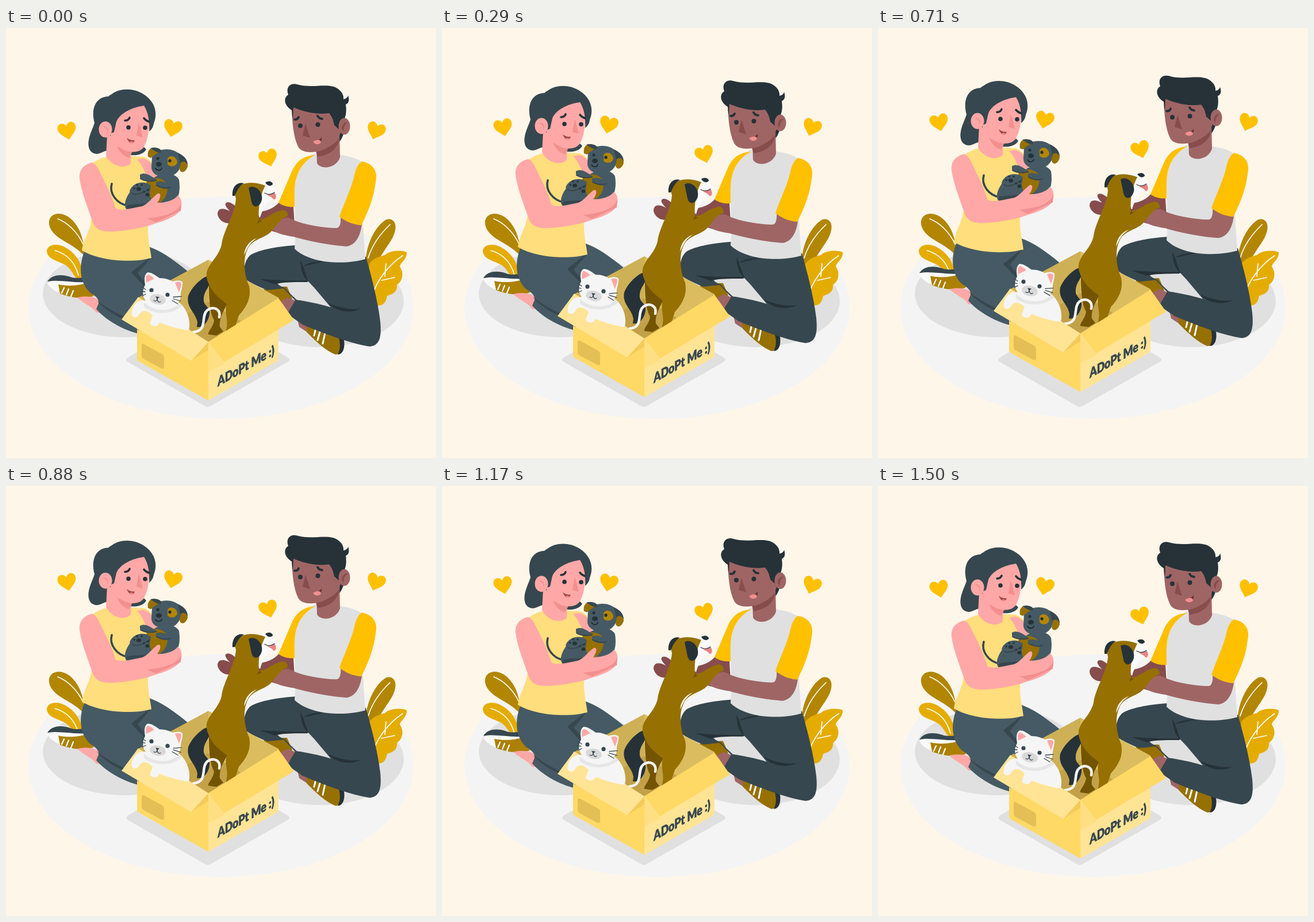
Recreate the animation shown at these times as an HTML page. Size 748 by 748 pixels, loop 1540 ms.

```html
<!DOCTYPE html>
<html lang="en">
<head>
<meta charset="utf-8">
<title>Adopt me</title>
<style>
html,body{margin:0;width:100%;height:100%;overflow:hidden;background:#fff6ea}
svg{display:block;width:100vw;height:100vh}
.line{fill:none;stroke-linecap:round;stroke-linejoin:round}
.ink{fill:#263238}.slate{fill:#37474f}.blue{fill:#455a64}
.skin{fill:#ffa8a7}.blush{fill:#f28f8f}
.tan{fill:#9f6565}.cocoa{fill:#874c4c}
.fur{fill:#967000}.deep{fill:#735400}
.white{fill:#fafafa}.cat{fill:#f5f5f5}.gold{fill:#ffc000}
.sun{fill:#ffd966}.cream{fill:#ffe496}
text{font:900 22px Lato,Inter,sans-serif;fill:#37474f;stroke:#37474f;stroke-width:.6}
</style>
</head>
<body>
<svg viewBox="0 0 748 748">
<defs>
  <path id="heart" d="M0 16C-6 9-16 4-16-5C-16-15-4-17 0-8C4-17 16-15 16-5C16 4 6 9 0 16Z"/>
</defs>

<!-- ground and plants -->
<ellipse cx="374" cy="486.5" rx="335" ry="193.5" fill="#f4f4f4"/>
<g fill="#e0e0e0">
  <ellipse cx="206" cy="462" rx="142" ry="76"/>
  <ellipse cx="546" cy="475" rx="146" ry="80"/>
  <path d="M212 573L345 497Q351 494 357 497L490 573Q496 577 490 581L357 657Q351 661 345 657L212 581Q206 577 212 573Z"/>
</g>
<path d="M140 400C120 377 96 371 84 358C70 344 72 325 90 323C110 322 129 344 134 372Z" fill="#b28600"/>
<path d="M140 450C118 438 117 421 103 412C88 404 71 402 71 387C73 376 89 374 102 381C120 390 130 406 134 426Z" fill="#e5ac00"/>
<path d="M628 436C618 394 637 349 660 334C672 329 680 338 677 352C673 374 649 390 637 432Z" fill="#b28600"/>
<path d="M632 410C640 400 648 398 659 395C666 388 684 385 697 390C698 402 686 408 685 415C693 427 690 440 680 447C681 460 672 463 663 466C661 479 654 485 642 482L628 475Z" fill="#e5ac00"/>
<g class="line" stroke="#fff" stroke-width="1.700">
  <path d="M90 332C106 338 124 354 134 376M85 387C106 393 120 408 126 430"/>
  <path d="M668 342C651 358 637 377 630 400M690 396C665 412 645 440 638 463M659 432L661 410M653 439L676 434"/>
</g>

<g id="float">
  <!-- hearts -->
  <g class="gold">
    <use href="#heart" transform="translate(106.500 178.500) rotate(-12)"/>
    <use href="#heart" transform="translate(290 174) rotate(13)"/>
    <use href="#heart" transform="translate(456.500 225.500) rotate(-17)"/>
    <use href="#heart" transform="translate(643.500 178.500) rotate(19)"/>
  </g>

  <!-- woman: foot and legs -->
  <path class="white" d="M72 443C87 436 112 438 136 442L140 462L108 466C92 462 76 454 72 443Z"/>
  <path d="M91 446C108 450 128 448 142 443L153 466C140 471 116 471 94 462Z" fill="#ac8000"/>
  <path class="slate" d="M72 441C80 428 97 428 112 433C123 437 131 433 137 435L140 442C119 444 92 437 72 441Z"/>
  <path class="line" d="M101 452L97 461M109 454L105 464M117 457L113 467" stroke="#fff" stroke-width="2.200"/>
  <path class="skin" d="M124 469C140 465 155 467 166 476L164 495L157 495C150 484 137 481 124 469Z"/>
  <path class="blue" d="M138 385C126 412 127 442 146 460C159 468 162 473 161 479L157 489C175 510 208 527 232 532L330 510L325 431C301 410 275 390 250 381Z"/>
  <path class="slate" d="M218 425L254 396C246 406 238 417 229 426L243 444L240 449ZM158 474C182 492 210 506 235 514C202 510 176 494 158 474Z"/>

  <!-- woman: torso and head -->
  <path class="slate" d="M208 213C221 218 233 214 240 207L244 211C239 221 223 223 212 220Z"/>
  <path d="M150 236C160 227 176 223 184 222L240 224C255 230 262 245 262 262V330L247 345C246 365 251 384 253 400C220 409 164 406 132 387C135 364 149 351 149 325Z" fill="#ffde7d"/>
  <path class="skin" d="M238 227C252 230 258 240 264 264L244 256C239 244 234 234 228 229Z"/>
  <path class="slate" d="M158 219C151 219 145 214 144 207C141 192 151 176 154 165C147 139 157 119 179 119L205 150L187 212C170 212 168 218 158 219Z"/>
  <path class="skin" d="M176 185L218 203L217 235C207 247 182 240 174 222Z"/>
  <path class="blush" d="M193 204C204 213 213 216 220 215L214 226C204 223 196 215 193 204Z"/>
  <path class="skin" d="M182 163C179 188 184 201 198 208C214 217 230 219 239 208C248 194 250 172 249 150L240 125L190 128Z"/>
  <path class="slate" d="M174 172C165 143 173 119 184 115C198 104 222 104 239 115C258 127 265 146 257 166C256 173 253 177 249 180C250 160 247 146 240 135C220 138 199 147 192 163L188 181L181 184Z"/>
  <ellipse class="skin" cx="173" cy="176.500" rx="11.500" ry="14"/>
  <path class="blush" d="M168 171C177 170 180 177 176 185C178 176 174 174 168 171ZM231 164L227 187L238 190Z"/>
  <g class="ink"><circle cx="213" cy="173" r="3.800"/><circle cx="242" cy="173.500" r="3.800"/></g>
  <path class="line" d="M207 161Q213 161 215 156M240 157Q243 161 249 163" stroke="#263238" stroke-width="3.600"/>
  <path d="M210 191C214 194 219 196 224 195C222 203 214 202 210 191Z" fill="#9e4e4e"/>
  <path d="M215 198Q219 196 222 199Q218 202 215 198Z" fill="#ff8585"/>

  <!-- puppy -->
  <path class="line" d="M184 271C179 288 193 306 212 309" stroke="#37474f" stroke-width="3.600"/>
  <path class="blue" d="M252 266C262 251 294 249 301 264C304 284 300 300 290 304L264 306C252 317 225 321 210 316C202 307 211 291 218 282C227 268 242 274 252 266Z"/>
  <path class="fur" d="M248 262C264 258 278 263 281 274C282 289 276 301 261 306C248 303 256 285 239 278Z"/>
  <path class="slate" d="M210 309C224 304 244 308 258 302C258 316 224 322 210 316Z"/>
  <path class="blue" d="M215 284C219 269 240 264 252 274C250 285 252 295 240 296C232 292 222 293 215 284Z"/>
  <path class="blue" d="M233 255C244 249 254 260 263 264C254 269 239 268 233 260ZM261 268C274 263 286 275 298 276C284 284 267 279 261 273Z"/>
  <path class="line" d="M234 262C242 267 252 267 261 265M262 274C271 279 280 279 286 277M219 287C226 292 240 287 250 279" stroke="#37474f" stroke-width="2"/>
  <g class="ink"><ellipse cx="231" cy="280" rx="4" ry="3.300"/><circle cx="223" cy="279" r="1.700"/><circle cx="228" cy="273" r="1.700"/><circle cx="236" cy="273" r="1.700"/><ellipse cx="246" cy="290" rx="3.500" ry="3"/><circle cx="240" cy="285" r="1.700"/><circle cx="247" cy="282" r="1.700"/></g>
  <path class="blue" d="M254 224C263 208 290 207 302 220C308 236 303 251 289 257C272 264 252 256 253 241Z"/>
  <path class="fur" d="M247 224C245 212 252 205 265 210L271 215C262 217 258 222 252 226Z"/>
  <path class="slate" d="M251 209C261 206 274 211 269 217C261 217 258 213 251 209ZM299 217C310 222 316 229 316 238L304 240Z"/>
  <path class="fur" d="M304 234C310 230 316 234 316 241C312 253 303 253 302 245Z"/>
  <path d="M281 227C286 219 297 224 298 233C297 241 286 243 281 237Z" fill="#b28600"/>
  <g class="ink"><circle cx="285" cy="231" r="2.800"/><circle cx="264" cy="227" r="2.600"/><ellipse cx="266" cy="237" rx="5" ry="4"/></g>
  <path class="line" d="M260 244C264 250 271 247 271 243" stroke="#182126" stroke-width="1.400"/>

  <!-- woman: near arm -->
  <path class="skin" d="M150 234C135 237 126 248 128 262C131 285 142 312 150 335C154 350 165 355 185 354C219 352 244 346 263 339C282 334 300 325 304 315C307 303 305 296 299 291C292 301 276 304 263 304C270 295 270 286 264 288C254 295 247 306 237 310C217 314 196 319 190 313C187 298 173 270 163 250C159 241 155 236 150 234Z"/>
  <path class="blush" d="M305 303C302 320 275 329 245 331L261 338L304 318Z"/>

  <!-- man: far arm, legs and feet -->
  <path class="cocoa" d="M476 302L500 311L503 360C480 360 450 352 435 338L407 332C392 346 371 340 368 324C368 313 378 312 390 319C382 311 378 304 386 303C397 304 402 316 415 320C437 322 462 320 476 302Z"/>
  <path class="fur" d="M449 452C464 453 477 449 489 450L498 471L480 480L447 470Z"/>
  <path class="tan" d="M478 475L490 469L505 475L494 501Z"/>
  <path class="tan" d="M507 507L528 516L527 531L510 520Z"/>
  <path class="fur" d="M523 518C540 518 560 529 583 537C590 552 587 567 573 568C557 562 540 546 523 529Z"/>
  <path class="ink" d="M578 536L588 543C590 557 586 568 577 568C582 559 582 548 578 536Z"/>
  <path class="line" d="M539 522L536 535M547 525L542 543M555 530L551 549" stroke="#fff" stroke-width="3"/>
  <path class="slate" fill-rule="evenodd" d="M502 378C470 380 435 387 424 396C412 408 413 428 418 438C430 446 445 452 455 456L483 453L503 474C498 483 492 491 490 498L516 516C550 530 595 548 632 554C649 553 654 540 651 510C646 470 635 430 626 398ZM471 443C494 441 514 439 526 441C540 455 552 471 565 486C543 479 520 475 506 473C498 466 490 458 485 452C478 450 474 447 471 443Z"/>
  <path class="ink" d="M512 404C520 420 520 427 526 440C516 434 513 420 512 404ZM516 414C530 407 544 405 555 406C538 409 527 413 516 414ZM442 437C459 437 473 440 527 439L524 442C502 442 478 442 468 446ZM561 478C578 487 602 491 618 488C596 499 570 491 561 478Z"/>

  <!-- man: torso and head -->
  <path d="M531 222C540 212 574 212 583 221C605 224 626 232 628 246L621 340C622 365 624 385 625 402C590 412 530 411 502 384C505 350 501 300 502 280C505 256 510 233 531 222Z" fill="#e0e0e0"/>
  <path class="gold" d="M538 221C515 222 503 235 497 250L474 304C482 310 492 312 502 311C502 290 500 270 509 250C515 238 526 226 538 221Z"/>
  <path class="ink" d="M575 160L591 162C590 179 586 192 577 202Z"/>
  <path class="tan" d="M540 205L580 178L581 225C574 245 547 247 541 235Z"/>
  <path class="cocoa" d="M539 214C558 211 573 201 580 191C577 211 563 221 542 224Z"/>
  <path class="tan" d="M497 140C498 165 500 190 508 206C514 218 532 217 546 214C566 207 580 195 584 175L580 130L510 125Z"/>
  <path class="ink" d="M499 158C497 151 498 147 497 143C485 136 481 122 491 116C486 103 495 95 506 98C530 105 550 97 570 102C583 107 588 116 587 124C592 123 595 120 595 117C598 126 596 131 591 133C593 146 591 157 585 164L579 176L571 169C569 158 566 153 562 148C543 151 520 147 500 138Z"/>
  <ellipse class="tan" cx="588.500" cy="171" rx="10" ry="14.500"/>
  <path class="cocoa" d="M584 175C585 166 590 163 595 164C589 167 588 172 587 180ZM521 166L516 187L529 191Z"/>
  <g class="ink"><circle cx="512" cy="170" r="4"/><circle cx="542.500" cy="168" r="4"/></g>
  <path class="line" d="M502 159Q507 160 509 155M542 153Q545 158 550 158" stroke="#263238" stroke-width="3.800"/>
  <path d="M534 198C541 197 546 194 549 190C551 199 542 205 534 198Z" fill="#6b3333"/>
  <path d="M534 198C541 193 548 194 548 199C544 204 537 203 534 198Z" fill="#f28f8f"/>

  <!-- man: near arm -->
  <path class="tan" d="M582 325C583 340 581 349 573 348C548 347 515 342 494 331C485 326 470 337 460 348C468 357 485 361 500 363C530 372 565 378 592 380C609 378 617 360 619 341Z"/>
  <path class="gold" d="M619 232C640 236 647 250 643 268C640 295 630 320 618 343C603 342 590 336 580 328C590 300 602 276 606 256C609 243 613 236 619 232Z"/>

  <!-- box inside -->
  <path d="M228 470L352 403V546L228 525Z" fill="#ceb056"/>
  <path d="M352 403L474 469V486L352 546Z" fill="#dbbd60"/>
  <path d="M352 476L408 510L352 546L292 510Z" fill="#c2a148"/>

  <!-- dog -->
  <path class="ink" d="M357 433C352 425 326 444 317 466C313 487 330 494 333 512L332 520C345 522 353 508 354 497C356 484 342 484 344 470C345 455 357 449 357 433Z"/>
  <path class="deep" d="M353 447C370 456 386 469 385 480C378 492 370 508 372 520L378 528L366 535L352 533C350 529 361 520 362 508C355 497 353 472 353 447Z"/>
  <path class="white" d="M436 275C445 266 461 265 465 274C472 283 473 293 465 296C455 301 447 312 442 330L429 320Z"/>
  <path class="fur" d="M397 285C405 267 430 266 451 274C444 288 438 307 440 333C455 333 463 320 477 318C485 313 493 323 489 328C476 330 468 350 457 358C444 367 427 369 420 385C411 404 415 431 423 449C427 469 419 485 405 500L395 530C389 538 381 535 383 525C388 506 379 498 384 480C370 469 357 460 350 438C343 414 369 403 375 377C378 352 398 325 400 297Z"/>
  <path class="white" d="M437 365C423 370 415 382 414 395L419 385C424 374 430 370 437 365Z"/>
  <path class="deep" d="M440 333L437 340L445 336Z"/>
  <path class="ink" d="M394 292C393 277 401 267 414 270C405 275 401 285 398 292ZM422 278C433 271 448 285 445 299C442 312 430 315 427 302Z"/>
  <path class="ink" d="M451 269C456 265 464 267 464 272C460 276 455 275 451 269Z"/>
  <path d="M453 289C460 291 463 287 468 287C471 294 470 299 465 298C462 293 457 293 453 289Z" fill="#e98282"/>
  <path class="line" d="M450 287Q459 292 467 286" stroke="#263238" stroke-width="1.200"/>
  <path class="line" d="M326 529C352 527 338 501 350 491C361 483 374 489 371 503" stroke="#f5f5f5" stroke-width="4.500"/>

  <!-- box outside -->
  <path class="sun" d="M228 525L352 546V648L228 578Z"/>
  <path class="cream" d="M352 546L474 508V578L352 648Z"/>
  <path d="M322 579L352 546V560Z" fill="#f3cb5a"/>
  <path d="M352 546L380 584L352 598Z" fill="#ffdf83"/>
  <path d="M240 550L271 567Q275 569 275 574V589Q275 594 270 592L240 576Q236 574 236 569V553Q236 548 240 550Z" fill="#e3bf55"/>
  <path class="cream" d="M230 468L352 546L322 579L201 507Z"/>
  <path class="sun" d="M352 546L474 470L501 508L379 581Z"/>
  <text transform="matrix(.81 -.46 0 1.050 368 624)">ADoPt Me :)</text>

  <!-- cat -->
  <path class="cat" d="M241 474C225 473 217 489 219 500C224 506 230 503 233 496C241 488 250 495 255 500L250 514C256 521 264 520 267 512C281 518 300 524 318 526C322 509 315 489 302 478Z"/>
  <path d="M240 477C252 490 280 498 303 479L307 483C285 503 252 496 240 485Z" fill="#e6e6e6"/>
  <path class="cat" d="M242 447C240 436 241 427 247 425C256 426 262 432 267 435C277 435 285 438 290 441C296 439 304 438 307 442C308 451 303 459 304 465C304 485 278 492 257 484C239 477 234 462 242 447Z"/>
  <path d="M244 443C242 434 244 429 248 429C253 431 256 434 258 436ZM294 443C299 441 305 441 305 445C305 451 302 456 301 460Z" fill="#ffa8a7"/>
  <ellipse cx="264" cy="472" rx="14" ry="9" fill="#d9d9d9" transform="rotate(12 264 472)"/>
  <g class="slate"><circle cx="253" cy="456" r="3.600"/><circle cx="281" cy="464" r="3.600"/><path d="M260 467L267 468L263 472Z"/></g>
  <path class="line" d="M263 471Q262 477 257 474M263 471Q264 479 269 476M243 455L236 450M242 459L235 458M243 463L237 466M291 468L305 467M291 471L304 475M289 474L299 480" stroke="#37474f" stroke-width="1.300"/>
</g>
</svg>
<script>
const LOOP = 1540, STEP = 1000 / 24, PEAK = 715, END = 1500, LIFT = 14.8;
const group = document.getElementById('float');

function height(ms) {
  return LIFT * (ms < PEAK ? ms / PEAK : Math.max(0, END - ms) / (END - PEAK));
}

// Linear bob, advanced at 24 pictures per second.
function draw(now) {
  const t = Math.floor((now % LOOP + 3) / STEP) * STEP;
  group.setAttribute('transform', `translate(0 ${-height(t).toFixed(2)})`);
  requestAnimationFrame(draw);
}
draw(performance.now());
</script>
</body>
</html>
```
